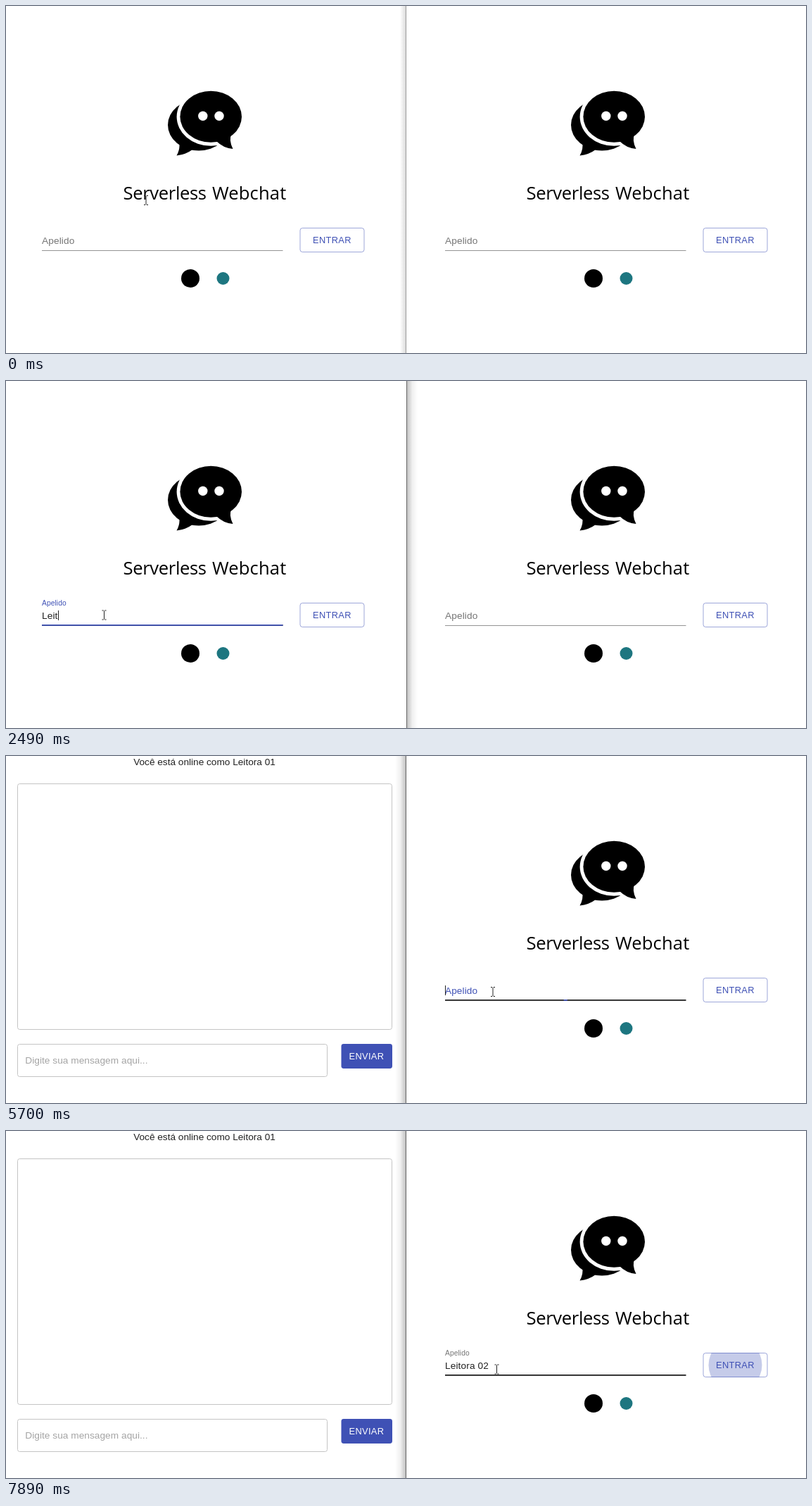
Animation of 1137x493 px, one loop 8000 ms. Source, as an HTML page:

```html
<!DOCTYPE html>
<html lang="pt">
<head>
<meta charset="utf-8">
<title>Serverless Webchat</title>
<style>
  html, body { margin: 0; width: 100%; height: 100%; overflow: hidden; background: #fff; }
  svg { display: block; width: 1137px; height: 493px; font: 13.65px "Liberation Sans", Arial, sans-serif; }
  text { white-space: pre; }
  .head { font: 25.6px "Open Sans", "Noto Sans", sans-serif; }
  .btn { font-size: 12.8px; letter-spacing: .366px; }
  .body { letter-spacing: .128px; }
</style>
</head>
<body>
<svg viewBox="0 0 1137 493" xmlns="http://www.w3.org/2000/svg">
  <defs>
    <linearGradient id="soft"><stop offset="0" stop-opacity="0"/><stop offset="1" stop-opacity=".14"/></linearGradient>
    <linearGradient id="toLeft"><stop offset="0" stop-opacity="0"/><stop offset=".5" stop-opacity=".06"/><stop offset="1" stop-opacity=".24"/></linearGradient>
    <linearGradient id="toRight"><stop offset="0" stop-opacity=".24"/><stop offset=".5" stop-opacity=".06"/><stop offset="1" stop-opacity="0"/></linearGradient>
    <clipPath id="btnClip"><rect x="418" y="315" width="91.5" height="35" rx="3.4"/></clipPath>
    <g id="login">
      <ellipse cx="274" cy="169" rx="44" ry="36.5"/>
      <path d="M246 193Q248 203 242.500 212.500Q256 211 265 204Z"/>
      <ellipse cx="291.2" cy="157.300" rx="48.600" ry="41.500" fill="#fff"/>
      <ellipse cx="291.2" cy="157.300" rx="43.800" ry="36.500"/>
      <path d="M321 181Q316 190 322.500 203Q309 202 299 192Z"/>
      <circle cx="279.800" cy="156.300" r="6.700" fill="#fff"/>
      <circle cx="303" cy="156.300" r="6.700" fill="#fff"/>
      <text class="head" y="275"><tspan x="166.500" letter-spacing="-.35">Serverless</tspan><tspan x="292.900" letter-spacing=".15">Webchat</tspan></text>
      <circle cx="262" cy="387" r="13"/>
      <circle cx="308.500" cy="387" r="9" fill="#1d7680"/>
    </g>
  </defs>
  <g id="scene"></g>
</svg>
<script>
const LOOP = 8000, BLUE = '#3f51b5', INK = '#212121', GREY = '#757575', BLINK = 530;
const scene = document.getElementById('scene');
const pen = document.createElement('canvas').getContext('2d');
pen.font = '13.65px "Liberation Sans", Arial, sans-serif';

// key times and the number of letters shown from then on
const left = {
  dx: 0, name: 'Leitora 01', focus: 1390, caretOff: 1710, blur: Infinity, hover: [430, 4700],
  keys: [[2030, 1], [2260, 2], [2410, 3], [2490, 4], [2660, 5], [2720, 7], [3270, 8], [3650, 9], [3740, 10]]
};
const right = {
  dx: 573, name: 'Leitora 02', focus: 5700, caretOff: 6240, blur: 7660, hover: [5490, LOOP],
  keys: [[6240, 1], [6390, 2], [6560, 3], [6640, 4], [6800, 5], [6870, 6], [6950, 7], [7020, 8], [7420, 9], [7490, 10]]
};

// time, x, y of the pointer
const track = [
  [0, 199, 276], [70, 199, 276], [560, 140, 333], [1000, 140, 333], [1010, 139.5, 332.5],
  [4510, 139.5, 332.5], [4990, 442, 323.5], [5310, 442, 323.5], [5540, 690, 334],
  [5700, 692, 335], [5900, 697.5, 338.5], [LOOP, 697.5, 338.5]
];

const clamp = v => Math.max(0, Math.min(1, v));
const easeOut = v => 1 - (1 - clamp(v)) ** 3;
const smooth = v => v * v * (3 - 2 * v);
const rect = (x, y, w, h, attrs) => `<rect x="${x}" y="${y}" width="${w}" height="${h}" ${attrs}/>`;
const text = (x, y, str, fill, attrs = '') => `<text x="${x}" y="${y}" fill="${fill}" ${attrs}>${str}</text>`;
const caret = (x, y) => rect(Math.round(x), y, 1, 14, `fill="${INK}"`);

function pointerAt(t) {
  const i = track.findIndex(p => p[0] > t);
  const a = track[i - 1], b = track[i];
  const k = smooth((t - a[0]) / (b[0] - a[0]));
  return [a[1] + (b[1] - a[1]) * k, a[2] + (b[2] - a[2]) * k];
}

function pointer(t) {
  const [x, y] = pointerAt(t);
  let shape = '<path d="M-3 -6.5H-.8M.8 -6.5H3M-3 6.5H-.8M.8 6.5H3M0 -6V6" fill="none" stroke="#222"/>';
  if (t < 5160 && x > 418) {
    shape = '<path d="M-1.5 0Q0 -1.500 1.200 0V5L6 6Q7.500 6.500 7.500 8L6.500 14H-1L-5 8.500Q-4.500 6.500 -1.500 9Z" fill="#fff" stroke="#222"/>';
  } else if ((x > 396 && t < 5160) || (x > 450 && x < 624)) {
    shape = '<path d="M0 0V13L3 10.300L5 15L7 14L5 9.500H9Z" fill="#fff" stroke="#222" stroke-width=".8"/>';
  }
  return `<g transform="translate(${x.toFixed(2)} ${y.toFixed(2)})">${shape}</g>`;
}

function field(f, t) {
  const focused = t >= f.focus && t < f.blur;
  const hovered = t >= f.hover[0] && t < f.hover[1];
  const up = easeOut((t - f.focus) / 200);
  const typed = f.keys.filter(k => k[0] <= t).pop();
  const value = typed ? f.name.slice(0, typed[1]) : '';
  const tint = focused ? BLUE : GREY;

  let out = hovered ? rect(51, 346, 342.500, 1.800, `fill="${INK}"`) : rect(51, 347, 342.500, 1, 'fill="#949494"');
  const grow = t < f.blur ? up : 1 - easeOut((t - f.blur) / 200);
  if (grow > 0) out += rect(222.250 - 171.250 * grow, 346, 342.500 * grow, 1.800, `fill="${BLUE}"`);
  out += `<g transform="translate(51 ${338 - 19 * up}) scale(${1 - .25 * up})">${text(0, 0, 'Apelido', tint, 'class="body"')}</g>`;
  if (value) out += text(51, 338, value, INK, 'class="body"');

  const on = typed ? Math.floor((t - typed[0]) / (BLINK + 5)) % 2 === 0 : t < f.caretOff;
  if (focused && on) out += caret(51 + pen.measureText(value).width + .128 * value.length, 326);
  return out;
}

function enterButton(t, f) {
  const hot = f === left ? clamp((t - 4850) / 140) : 0;
  let out = '';
  if (hot) out += rect(418, 315, 91.500, 35, `rx="3.4" fill="${BLUE}" fill-opacity="${.04 * hot}"`);
  if (t >= f.blur) {
    const k = easeOut((t - f.blur + 40) / 290);
    out += `<circle cx="463.5" cy="332.5" r="${38 * k}" fill="${BLUE}" fill-opacity="${.1 + .2 * k}" clip-path="url(#btnClip)"/>`;
  }
  out += rect(418, 315.500, 91, 34, `rx="3.4" fill="none" stroke="${BLUE}" stroke-opacity="${.5 + .5 * hot}"`);
  return out + text(436, 337, 'ENTRAR', BLUE, 'class="btn"');
}

const login = (f, t) =>
  `<g transform="translate(${f.dx} 0)"><use href="#login"/>${field(f, t)}${enterButton(t, f)}</g>`;

function chat(t) {
  const active = t < right.focus;
  const over = t < 5400;
  let out = text(282, 12.500, 'Você está online como ' + left.name, INK, 'text-anchor="middle"');
  out += rect(16.500, 39.500, 532, 349, `rx="3" fill="none" stroke="${over ? INK : '#c4c4c4'}"`);
  out += active
    ? rect(17, 410, 439, 45, `rx="3" fill="none" stroke="${BLUE}" stroke-width="2"`)
    : rect(16.500, 409.500, 440, 46, 'rx="3" fill="none" stroke="#c4c4c4"');
  out += text(27.300, 437, 'Digite sua mensagem aqui...', '#a4a4a4', 'letter-spacing=".05"');
  if (active) out += caret(28, 425);
  out += rect(476.500, 409, 72.500, 35, `rx="3.4" fill="${BLUE}"`);
  return out + text(487.500, 431, 'ENVIAR', '#fff', 'class="btn"');
}

function divider(t) {
  if (t < left.focus) return rect(560, 0, 8, 493, 'fill="url(#soft)"') + rect(568, 0, 1, 493, 'fill="#9c9c9c"');
  if (t < right.focus) return rect(570, 0, 15, 493, 'fill="url(#toRight)"') + rect(569, 0, 1, 493, 'fill="#666"');
  return rect(553, 0, 15, 493, 'fill="url(#toLeft)"') + rect(568, 0, 1, 493, 'fill="#666"');
}

function draw(t) {
  scene.innerHTML = (t < 5160 ? login(left, t) : chat(t)) + login(right, t) + divider(t) + pointer(t);
}

const start = performance.now();
function tick() {
  draw((performance.now() - start) % LOOP);
  requestAnimationFrame(tick);
}
draw(0);
requestAnimationFrame(tick);
</script>
</body>
</html>
```
